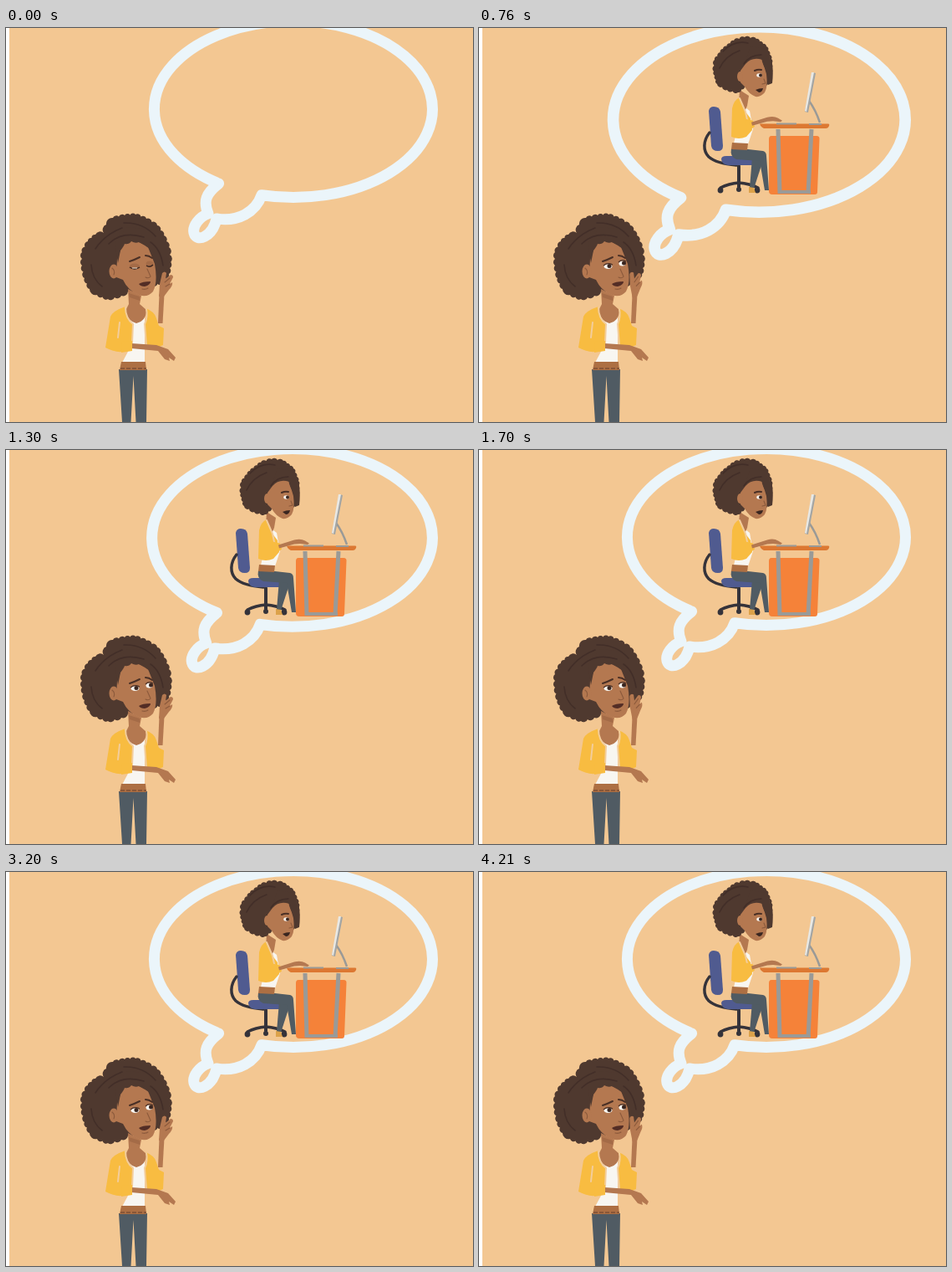
An HTML page that plays this animation: 559x471 px, repeating every 4.3 s.

```html
<!DOCTYPE html>
<html lang="en">
<head>
<meta charset="utf-8">
<title>Thinking about work</title>
<style>
html, body { margin: 0; width: 100%; height: 100%; overflow: hidden; background: #f3c792; }
svg { display: block; width: 559px; height: 471px; }
.skin { fill: #b47850; }
.shade { fill: #a46b47; }
.hair { fill: #4f392f; }
.strand { fill: none; stroke: #422e28; stroke-width: 1.6; stroke-linecap: round; }
.jacket { fill: #f8bc41; }
.trim { fill: none; stroke: #f3cd9b; stroke-width: 2; stroke-linecap: round; }
.white { fill: #f8f6f1; }
.jeans { fill: #505b63; }
.belt { fill: #ad6f43; }
.dark { fill: #3a2620; }
.brow { fill: none; stroke: #4a3026; stroke-width: 2; stroke-linecap: round; }
.thin { fill: none; stroke: #8c5a3c; stroke-width: 1.1; stroke-linecap: round; }
.blue { fill: #505b90; }
.black { fill: none; stroke: #35333a; stroke-linecap: round; }
.grey { fill: none; stroke: #9a9a97; }
</style>
</head>
<body>
<svg viewBox="0 0 559 471">
  <rect width="559" height="471" fill="#f3c792"/>
  <rect width="4" height="471" fill="#fff"/>

  <path id="bubble" fill="none" stroke="#ebf5fa" stroke-width="13" stroke-linejoin="round"
    d="M254.600 193A166.500 105.500 0 1 1 306 206.700C299 227 278 239 252 235C247 257 228 264 225 252C223 244 231 233 242 229C236 214 239 205 254.600 193Z"/>

  <g id="office">
    <path class="blue" d="M275 99Q276 94 281 94Q288 94 289 100L292 141Q292 147 286 147Q279 147 278 141Z"/>
    <g class="black">
      <path stroke-width="3.500" d="M276 125C268 135 268 147 275 154Q284 162 308 164"/>
      <path stroke-width="4" d="M311 165V190"/>
      <path stroke-width="3.500" d="M289 191Q299 186 311 185Q324 186 334 191"/>
    </g>
    <g fill="#35333a"><circle cx="289" cy="194" r="3.400"/><circle cx="311" cy="193" r="3"/><circle cx="333" cy="194" r="3.400"/></g>

    <path class="blue" d="M290 157Q290 153 296 153H328Q334 154 334 159Q333 164 326 164H298Q291 163 290 157Z"/>
    <path class="jeans" d="M327 155L341 155L329 192L324 191Z"/>
    <path fill="#dca24a" d="M323 190L329 191L331 197L323 197Z"/>
    <path class="jeans" d="M302 144L322 145L340 147Q344 148 344 153L347 194H342L336 159L308 157Q300 154 302 144Z"/>

    <path class="white" d="M315 92L324 99L328 121L322 139L305 138Z"/>
    <path class="belt" d="M303 137L322 138L321 146L302 145Z"/>
    <path class="skin" d="M312 74L323 81L321 93L318 100L311 90Z"/>
    <path class="jacket" d="M312 83Q305 86 303 96L302 130Q311 134 320 130L327 122L325 108L318 99Z"/>
    <path class="trim" d="M312 84L319 100L323 119"/>

    <path class="hair" id="officeHair"/>
    <path class="skin" d="M319 43Q327 34 339 38L344 55Q346 70 342 77Q337 83 331 82Q323 79 318 70L313 65V51Z"/>
    <ellipse class="skin" cx="312.500" cy="58" rx="3.500" ry="6"/>
    <path class="hair" d="M317 44Q327 31 338 36Q340 46 345 52L346 68L351 66Q354 40 345 25L325 22Z"/>
    <path class="strand" d="M292 28Q305 14 322 18M288 48Q295 33 312 27M317 43Q324 32 338 32"/>
    <path class="brow" stroke-width="1.500" d="M330 51Q334 49 338 50"/>
    <ellipse class="white" cx="335.500" cy="56.500" rx="3.200" ry="2.200"/>
    <circle class="dark" cx="337" cy="56.500" r="2"/>
    <path class="thin" d="M341 61L343 66L339 67"/>
    <path class="dark" d="M331 74Q335 72 340 72Q339 77 335 77Z"/>

    <path fill="#f58239" d="M350 129H404Q408 129 407.500 133L405 196Q405 199 402 199H351Q347 199 347 195V133Q347 129 350 129Z"/>
    <g class="grey" stroke-width="5">
      <path d="M358 121L360 198"/><path d="M398 121L394 198"/><path d="M358 196H397" stroke-width="4"/>
    </g>
    <path fill="#dc7832" d="M336 114.500H418Q420 115 419 117Q418 120 415 120H341Q337 118 336 114.500Z"/>
    <path class="grey" stroke-width="2.500" d="M395 87Q403 98 408 113"/>
    <path class="grey" stroke-width="2" d="M395 115H410M356 114.500H380"/>
    <path fill="#a3a5a4" d="M399 53L403 54L394 101L390 100Z"/>
    <path fill="#e8e8e4" d="M398 53L401 53L392 100L390 99Z"/>
    <g id="typing">
      <path class="jacket" d="M319 109L328 111L330 118L321 125Z"/>
      <path class="skin" d="M326 113L345 107Q353 105 358 108L363 111L361 112.500L352 111.500L345 112L327 117Z"/>
    </g>
  </g>

  <g id="thinker">
    <path class="jeans" d="M135 408H169L168 471H155.500L152.500 416L149.500 471H139Z"/>
    <path class="white" d="M147 345H166L166 400H139L147 385Z"/>
    <path class="belt" d="M138 399H167L168 409H136Z"/>
    <path stroke="#7d4f35" stroke-width="1.500" stroke-dasharray="5 2" d="M137 407H168"/>
    <path class="hair" id="thinkerHair"/>
    <path class="skin" d="M146 312L162 320L160 330L168 337Q168 350 156 353Q145 350 143 338L147 330Z"/>
    <path class="shade" d="M147 317L160 321V326L148 322Z"/>
    <path class="jacket" d="M143 333Q128 338 125 345L119 382Q130 388 139 387L151 383L152 354Q143 347 143 333Z"/>
    <path class="jacket" d="M167 335Q178 339 180 347L183 356L189 359L188 379Q179 384 168 383L166 354Q170 345 167 335Z"/>
    <path class="trim" d="M143 334Q143 347 152 354L151 376M168 336Q170 345 166 354L168 380M136 352L134 370"/>

    <path class="skin" d="M140 258Q154 250 170 262L178 282Q182 304 176 315Q169 323 159 319Q146 314 140 301L132 298L133 276Z"/>
    <ellipse class="skin" cx="129" cy="291" rx="5.500" ry="8.500"/>
    <path class="thin" d="M127 287Q131 290 129 295"/>
    <path class="hair" d="M134 281L137 266Q141 261 142 258Q147 259 150 255Q155 258 159 256Q167 260 172 264Q176 270 177 277L183 294L192 294L198 283L193 260L174 241L145 238L130 256Z"/>
    <path class="strand" d="M107 264Q118 247 139 239M123 258Q139 242 165 250M141 233Q164 232 179 249M173 256Q185 264 188 284M102 283Q103 300 115 309"/>

    <path class="brow" d="M148 279Q154 277 160 274M167 272Q171 272 175 275"/>
    <g id="openEyes">
      <ellipse class="white" cx="154.500" cy="285" rx="5" ry="3"/>
      <ellipse class="white" cx="171.500" cy="281.500" rx="4" ry="3"/>
      <circle class="dark" cx="156" cy="284.500" r="2.500"/>
      <circle class="dark" cx="173.500" cy="281" r="2.500"/>
      <path d="M149 284Q154 280 160 283M167 280Q171 276 176 279" fill="none" stroke="#4a3026" stroke-width="1.200"/>
    </g>
    <g id="closedEyes">
      <ellipse class="shade" cx="154" cy="285" rx="6" ry="3.500"/>
      <ellipse class="shade" cx="172" cy="282" rx="4.500" ry="3.500"/>
      <path d="M148 286Q154 290 160 286M168 284Q172 287 176 283" fill="none" stroke="#3a2620" stroke-width="1.500"/>
      <path d="M151 287L157 287" stroke="#e9dfd2"/>
    </g>
    <path class="thin" d="M169 288L173 297Q171 300 167 298"/>
    <path fill="#532d25" d="M159 306Q163 303 173 303Q173 307 166 309Q161 309 159 306Z"/>
    <path class="thin" d="M163 312Q167 313 170 311"/>

    <path class="skin" d="M150 377L180 379L194 384L203 394L201 398L195 394L196 398L190 396L182 386L150 383Z"/>
    <path class="jacket" d="M139 375L151 374L151 386L138 388Z"/>
    <path class="skin" d="M182 353L183.500 318H189.500L187.500 353Z"/>
    <g id="hand">
      <path class="skin" d="M183 321L184 306L187 293Q190 290 192 293L191 300L197 295Q200 295 200 298L196 306L199 304Q200 308 195 313L189 321Z"/>
      <path class="thin" d="M190 304L196 299M191 309L196 306"/>
    </g>
  </g>
</svg>
<script>
const LOOP = 4300;
const CUT = 380;
const BUBBLE_STEPS = [380, 540, 610, 690, 760, 930, 1000, 1070, 1160, 1300, 1390];
const HAND_IN = [[610, 930], [1620, 1860], [2330, 2650], [3500, 3810], [4130, 4300]];
const $ = id => document.getElementById(id);

// Closed outline of small bumps through the given corner points.
function scallop(text, size) {
  const points = text.split(" ").map(p => p.split(",").map(Number));
  let d = "M" + points[0];
  points.forEach(([x, y], i) => {
    const [nx, ny] = points[(i + 1) % points.length];
    const length = Math.hypot(nx - x, ny - y);
    const count = Math.max(1, Math.round(length / size));
    const r = length / count * 0.62;
    for (let k = 1; k <= count; k++)
      d += `A${r} ${r} 0 0 1 ${x + (nx - x) * k / count} ${y + (ny - y) * k / count}`;
  });
  return d + "Z";
}

function easeOutBack(p) {
  const u = p - 1;
  return 1 + 2.70158 * u ** 3 + 1.70158 * u ** 2;
}

const show = (id, on) => $(id).style.display = on ? "" : "none";

function draw(t) {
  const afterCut = t >= CUT;
  const step = BUBBLE_STEPS.filter(s => s <= t).length;
  const scale = easeOutBack(Math.min(1, (step - 0.74) / 10));
  $("bubble").setAttribute("transform", afterCut
    ? `translate(517 -7) scale(${scale}) translate(-517 7)`
    : "translate(0 -7)");
  show("office", afterCut);

  const blinking = t < 70;
  show("openEyes", !blinking);
  show("closedEyes", blinking);

  const handIn = HAND_IN.some(([from, to]) => t >= from && t < to);
  $("hand").setAttribute("transform", `rotate(${handIn ? -15 : 0} 187 319)`);
  const tap = 0.5 * Math.sin(t / LOOP * Math.PI * 22);
  $("typing").setAttribute("transform", `translate(0 ${tap})`);
}

$("thinkerHair").setAttribute("d", scallop(
  "120,235 128,227 142,224 155,223 168,228 181,236 189,248 195,262 197,280 195,294 188,304 168,310 146,315 138,320 122,324 109,319 100,312 94,299 91,284 91,268 98,255 107,247 117,245", 8));
$("officeHair").setAttribute("d", scallop(
  "305,15 318,11 332,13 344,22 350,37 350,54 346,67 330,70 318,70 310,77 297,74 285,67 281,52 282,38 292,25", 6));

const start = performance.now();
function frame() {
  draw((performance.now() - start) % LOOP);
  requestAnimationFrame(frame);
}
frame();
</script>
</body>
</html>
```
